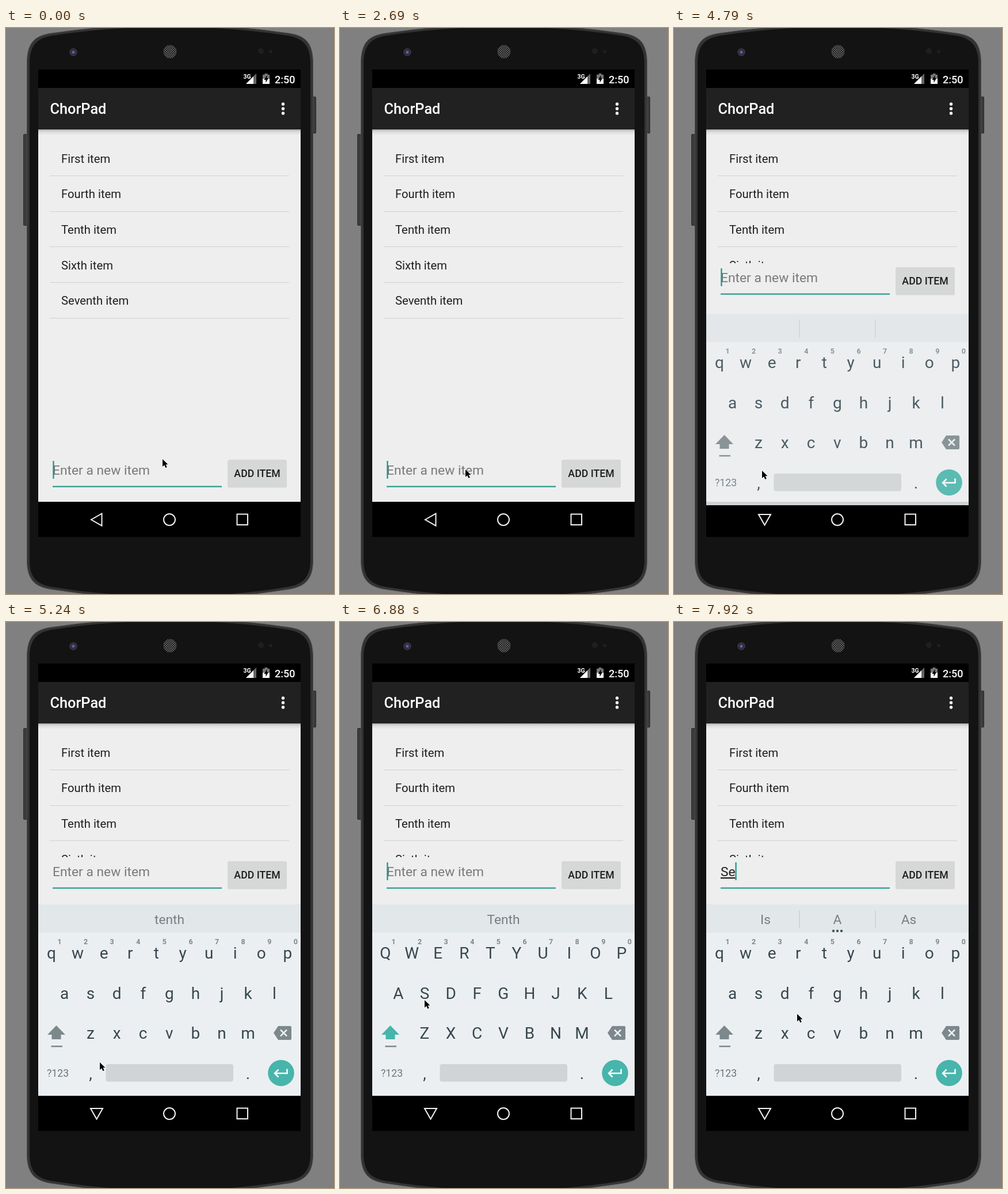
These frames come from a looping animation (570 px wide and 982 px high, 8000 ms). An HTML page:

```html
<!DOCTYPE html>
<html lang="en">
<head>
<meta charset="utf-8">
<title>To-do list demo</title>
<style>
  html, body { margin: 0; width: 100%; height: 100%; overflow: hidden; background: #808080; }
  svg { display: block; width: 570px; height: 982px; font-family: Roboto, sans-serif; }
  .medium { font-weight: 500; }
  .item { font-size: 20.3px; fill: #1f1f1f; }
  .key { font-size: 28px; fill: #37474f; text-anchor: middle; }
  .digit { font-size: 12.5px; font-weight: 700; fill: #7d888c; text-anchor: middle; }
  .hint { font-size: 22.8px; fill: #758084; text-anchor: middle; }
  .nav { fill: none; stroke: #f2f2f2; stroke-width: 2; }
</style>
</head>
<body>
<svg viewBox="0 0 570 982">
  <defs>
    <linearGradient id="shadow" x2="0" y2="1">
      <stop stop-color="#000" stop-opacity=".26"/>
      <stop offset=".4" stop-color="#000" stop-opacity=".08"/>
      <stop offset="1" stop-color="#000" stop-opacity="0"/>
    </linearGradient>
    <radialGradient id="lens">
      <stop stop-color="#8580b8"/>
      <stop offset=".45" stop-color="#3c3860"/>
      <stop offset=".75" stop-color="#25232f"/>
      <stop offset="1" stop-color="#5a5962"/>
    </radialGradient>
    <pattern id="mesh" width="4" height="4" patternUnits="userSpaceOnUse">
      <rect width="4" height="4" fill="#5c5c5c"/>
      <circle cx="1" cy="1" r="1.1" fill="#191919"/>
      <circle cx="3" cy="3" r="1.1" fill="#191919"/>
    </pattern>
    <clipPath id="listClip"><rect id="listArea" x="56" y="176" width="456" height="565"/></clipPath>
  </defs>

  <!-- phone -->
  <rect width="570" height="982" fill="#808080"/>
  <g fill="#3b3b3b" stroke="#2a2a2a">
    <rect x="30.5" y="184.5" width="7" height="158" rx="1"/>
    <rect x="532.5" y="119.5" width="6" height="63" rx="1"/>
  </g>
  <path fill="#333" stroke="#4c4c4c" d="M36.5 60C37 25 50 13 80 9Q180-6 285-6T490 9C520 13 533 25 533.5 60V925C533 960 516 970 490 974Q390 990 285 990T80 974C53 970 37 960 36.5 925Z"/>
  <path fill="#131313" d="M41 62C41 30 54 17 82 13Q180-2 285-2T488 13C516 17 529 30 529 62V923C529 955 514 966 488 970Q390 986 285 986T82 970C55 966 41 955 41 923Z"/>
  <circle cx="117" cy="42" r="6.5" fill="url(#lens)"/>
  <circle cx="285" cy="41" r="11.5" fill="url(#mesh)"/>
  <g fill="#1f1f1f"><circle cx="443" cy="40" r="5"/><circle cx="460" cy="41" r="3"/></g>

  <!-- screen -->
  <rect x="56" y="72" width="456" height="811"/>
  <rect x="56" y="176" width="456" height="646" fill="#eee"/>
  <rect x="56" y="176" width="456" height="10" fill="url(#shadow)"/>
  <rect x="56" y="104" width="456" height="72" fill="#212121"/>
  <g fill="#fff">
    <text x="412.5" y="88" font-size="10.5" font-weight="700">3G</text>
    <path fill="#666" d="M417 97H435V79Z"/>
    <path d="M417 97H430V84Z"/>
    <path fill="#777" d="M446 81H449.500V79H454.500V81H458V89H446Z"/>
    <path d="M446 88H458V97H446Z"/>
    <path fill="#000" d="M453.500 82L448.500 90H451.500V95L456 87H453.500Z"/>
    <text x="467" y="95.500" font-size="18" class="medium">2:50</text>
    <text x="76.500" y="149" font-size="25.300" class="medium">ChorPad</text>
    <circle cx="481.500" cy="132" r="2.700"/>
    <circle cx="481.500" cy="140" r="2.700"/>
    <circle cx="481.500" cy="148" r="2.700"/>
  </g>
  <g id="list" clip-path="url(#listClip)"></g>

  <g id="form">
    <text id="entry" x="81" y="775" font-size="22.8"></text>
    <rect x="81" y="794.500" width="294" height="2.200" fill="#279b8e"/>
    <rect id="caret" y="751" width="2.300" height="31" fill="#1a9a8c"/>
    <rect x="385" y="749.500" width="103" height="48" rx="3" fill="#000" opacity=".1"/>
    <rect x="385.500" y="749" width="102" height="46.500" rx="2.500" fill="#d6d7d7"/>
    <text x="436.500" y="778.500" font-size="17.700" class="medium" text-anchor="middle" fill="#1c1c1c">ADD ITEM</text>
  </g>

  <path id="back" class="nav" d="M148 853L166.500 842.500V863.500Z"/>
  <circle class="nav" cx="284" cy="853" r="10"/>
  <rect class="nav" x="401.500" y="843.500" width="18.500" height="18.500"/>

  <g id="keyboard">
    <rect x="56" y="490" width="456" height="332" fill="#eceff1"/>
    <rect x="56" y="490" width="456" height="49" fill="#e2e7e9"/>
    <path id="dividers" stroke="#cbd1d3" stroke-width="1.500" d="M218 500V531M350 500V531"/>
    <g id="hints"></g>
    <g id="dots" fill="#4a5458">
      <circle cx="277" cy="536" r="2.200"/><circle cx="284" cy="536" r="2.200"/><circle cx="291" cy="536" r="2.200"/>
    </g>
    <g id="keys"></g>
    <path id="shift" d="M87.500 700L103 716H95.500V724H79.500V716H72Z"/>
    <rect x="78.500" y="735" width="19.500" height="2.500" fill="#7c888c"/>
    <path fill="#7c888c" d="M465 713L473 701H494Q496 701 496 703V723Q496 725 494 725H473Z"/>
    <path stroke="#eceff1" stroke-width="2.500" d="M477 707.500L488 718.500M488 707.500L477 718.500"/>
    <text x="90" y="789" font-size="17.700" text-anchor="middle" fill="#6b777c">?123</text>
    <text class="key" x="147" y="793">,</text>
    <rect x="173.500" y="767" width="221.500" height="30.500" rx="4" fill="#d0d4d6"/>
    <text class="key" x="420.500" y="793">.</text>
    <circle cx="478" cy="782.500" r="22.800" fill="#47b5ab"/>
    <path fill="none" stroke="#fff" stroke-width="2.500" d="M488.500 775.500V783H467.500M473.500 776.500L467 783L473.500 789.500"/>
  </g>

  <path id="pointer" stroke="#fff" stroke-width="1.600" stroke-opacity=".8" paint-order="stroke" d="M0 0V13L3.200 10.200L5.400 15L7.800 14L5.600 9.200H9.500Z"/>
</svg>

<script>
const LOOP = 8000;
const FORM_LIFT = -334;
const KEYBOARD_AT = 4490, STRIP_AT = 4940, CAPS_AT = 6440, TYPE_S_AT = 7180, TYPE_E_AT = 7630;

// The caret starts visible and flips at each of these times.
const caretFlips = [150, 740, 1190, 1790, 2240, 2690, 3140, 3740, 4340, 4490, 5240, 5690, 6290, 6740];

// Each move: time, x, y; the pointer holds still until the next one.
const moves = [
  [0, 272, 748],
  [2090, 283, 750], [2240, 266, 756], [2390, 242, 762], [2540, 226, 765], [2690, 218, 766],
  [3140, 196, 769], [3290, 168, 770], [3440, 153, 768],
  [5240, 163, 764], [5390, 177, 754], [5540, 184, 737], [5690, 176, 713],
  [5840, 150, 688], [5990, 122, 670], [6140, 107, 663],
  [6290, 92, 705], [6440, 87, 745], [6590, 96, 728], [6740, 128, 686], [6880, 147, 656],
  [7180, 150, 648], [7330, 162, 604], [7480, 170, 587], [7630, 173, 586], [7780, 191, 637], [7920, 214, 680]
];

// Time, vertical offset and opacity while the keyboard slides in.
const slide = [[KEYBOARD_AT, 36, .2], [4640, 18, .6], [4790, 6, .88], [4940, 0, 1]];

const $ = id => document.getElementById(id);

function add(parent, tag, attributes, text = "") {
  const node = document.createElementNS("http://www.w3.org/2000/svg", tag);
  for (const name in attributes) node.setAttribute(name, attributes[name]);
  node.textContent = text;
  return parent.appendChild(node);
}

const show = (id, visible) => $(id).style.display = visible ? "" : "none";
const latest = (steps, t) => steps.filter(step => step[0] <= t).pop();

["First", "Fourth", "Tenth", "Sixth", "Seventh"].forEach((name, i) => {
  add($("list"), "text", { class: "item", x: 96, y: 233.5 + 61.7 * i }, name + " item");
  add($("list"), "rect", { x: 76, y: Math.round(256 + 61.7 * i), width: 416, height: 1, fill: "#d0d0d0" });
});

const keys = [];
[["qwertyuiop", 79], ["asdfghjkl", 101.5], ["zxcvbnm", 147]].forEach(([letters, left], row) => {
  [...letters].forEach((letter, i) => {
    const x = left + 45.6 * i;
    keys.push(add($("keys"), "text", { class: "key", x, y: 584 + 69.5 * row }, letter));
    if (row === 0) add($("keys"), "text", { class: "digit", x: x + 14, y: 559 }, (i + 1) % 10);
  });
});

const hints = [159, 284, 408].map(x => add($("hints"), "text", { class: "hint", x, y: 524 }));

function suggestions(t) {
  if (t < STRIP_AT) return ["", "", ""];
  if (t < CAPS_AT) return ["", "tenth", ""];
  if (t < TYPE_E_AT) return ["", "Tenth", ""];
  return ["Is", "A", "As"];
}

function draw(t) {
  const open = t >= KEYBOARD_AT;
  const caps = t >= CAPS_AT && t < TYPE_S_AT;
  const typed = t < TYPE_S_AT ? "" : t < TYPE_E_AT ? "S" : "Se";

  $("listArea").setAttribute("height", open ? 232 : 565);
  $("form").setAttribute("transform", `translate(0 ${open ? FORM_LIFT : 0})`);
  $("back").setAttribute("transform", open ? "rotate(-90 157.5 853)" : "");

  const entry = $("entry");
  entry.textContent = typed || "Enter a new item";
  entry.setAttribute("fill", typed ? "#212121" : "#7a7a7a");
  entry.setAttribute("text-decoration", typed ? "underline" : "none");
  $("caret").setAttribute("x", 81.3 + (typed ? entry.getComputedTextLength() - .5 : 0));
  show("caret", caretFlips.filter(time => time <= t).length % 2 === 0);

  show("keyboard", open);
  if (open) {
    const [, offset, opacity] = latest(slide, t);
    $("keyboard").setAttribute("transform", `translate(0 ${offset})`);
    $("keyboard").setAttribute("opacity", opacity);
  }
  keys.forEach(key => {
    key.textContent = caps ? key.textContent.toUpperCase() : key.textContent.toLowerCase();
  });
  $("shift").setAttribute("fill", caps ? "#47b5ab" : "#7c888c");
  suggestions(t).forEach((word, i) => hints[i].textContent = word);
  show("dividers", t < STRIP_AT || t >= TYPE_E_AT);
  show("dots", t >= TYPE_E_AT);

  const [, x, y] = latest(moves, t);
  $("pointer").setAttribute("transform", `translate(${x} ${y})`);
}

const start = performance.now();
function frame() {
  draw((performance.now() - start) % LOOP);
  requestAnimationFrame(frame);
}
frame();
</script>
</body>
</html>
```
